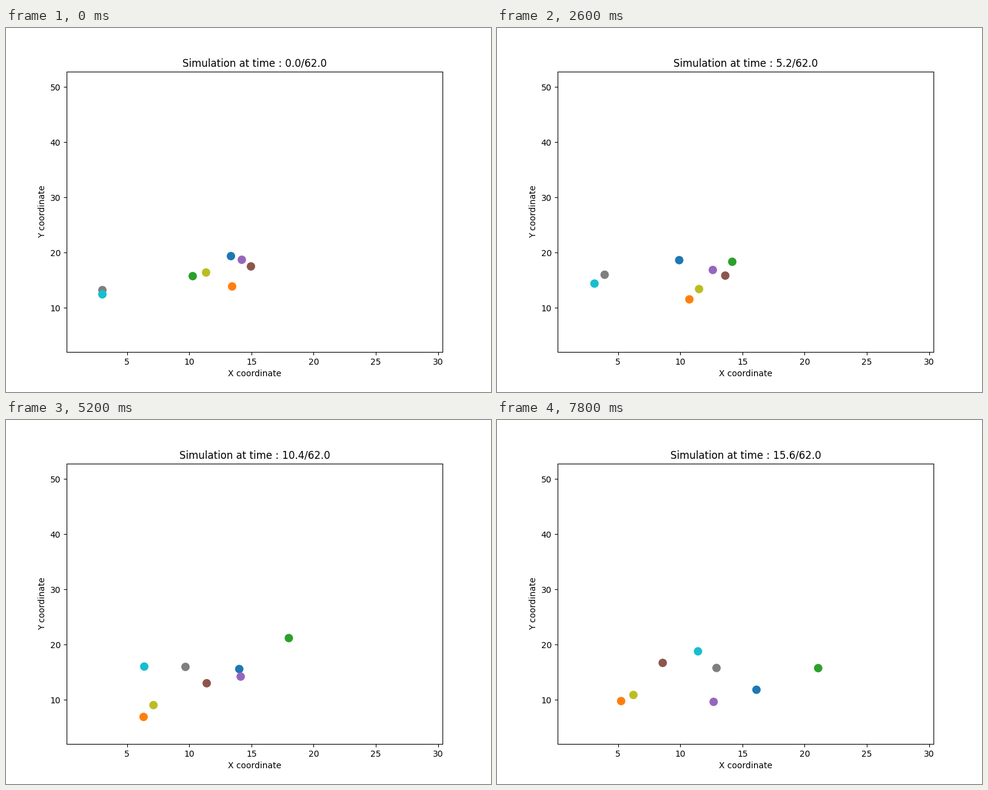
These frames come from a looping animation (800x600 px, 8 s). A matplotlib script:

```python
import matplotlib.pyplot as plt
import numpy as np
from matplotlib.animation import FuncAnimation

W, H, DPI = 800, 600, 100
FRAMES, INTERVAL = 40, 200
STEP, END = 0.4, 62.0

# Waypoints on the stage (x right, y down), evenly spaced in time.
WALKS = {
    "C0": [(371, 376), (289, 387), (318, 382), (370, 403), (425, 434), (428, 446)],
    "C1": [(373, 426), (350, 438), (295, 455), (236, 487), (211, 485), (204, 460)],
    "C2": [(308, 409), (371, 395), (427, 362), (491, 366), (534, 414)],
    "C4": [(389, 382), (357, 398), (361, 400), (391, 416), (361, 447), (357, 467)],
    "C5": [(404, 393), (388, 404), (345, 419), (320, 437), (268, 396)],
    "C7": [(159, 432), (139, 418), (207, 402), (276, 405), (352, 413), (363, 408)],
    "C8": [(330, 403), (351, 414), (316, 441), (258, 466), (208, 474), (228, 450)],
    "C9": [(159, 439), (131, 420), (182, 422), (214, 411), (279, 391), (339, 380)],
}


def walk(points):
    """Catmull-Rom curve through the waypoints, one position per frame."""
    p = np.array(points, float)
    p = np.vstack([2 * p[0] - p[1], p, 2 * p[-1] - p[-2]])
    t = np.arange(FRAMES) / FRAMES * (len(points) - 1)
    i = t.astype(int)
    u = (t - i)[:, None]
    a, b, c, d = (p[i + k] for k in range(4))
    return b + u / 2 * (c - a + u * (2 * a - 5 * b + 4 * c - d
                                     + u * (3 * (b - c) + d - a)))


fig, ax = plt.subplots(figsize=(W / DPI, H / DPI), dpi=DPI)
ax.set_xlim(0.145, 30.36)
ax.set_ylim(2.01, 52.78)
ax.set_xticks(range(5, 31, 5))
ax.set_yticks(range(10, 51, 10))
ax.set_xlabel("X coordinate")
ax.set_ylabel("Y coordinate")
title = ax.set_title("")

stage = np.stack([walk(points) for points in WALKS.values()], axis=1)
stage[..., 1] = H - stage[..., 1]
to_data = ax.transData.inverted()
tracks = [to_data.transform(points) for points in stage]
dots = ax.scatter(*tracks[0].T, s=100, c=list(WALKS), linewidths=0, zorder=2)


def draw(i):
    dots.set_offsets(tracks[i])
    title.set_text(f"Simulation at time : {i * STEP:.1f}/{END}")
    return dots, title


anim = FuncAnimation(fig, draw, frames=FRAMES, interval=INTERVAL,
                     init_func=lambda: draw(0), repeat=True, repeat_delay=0)
plt.show()
```
